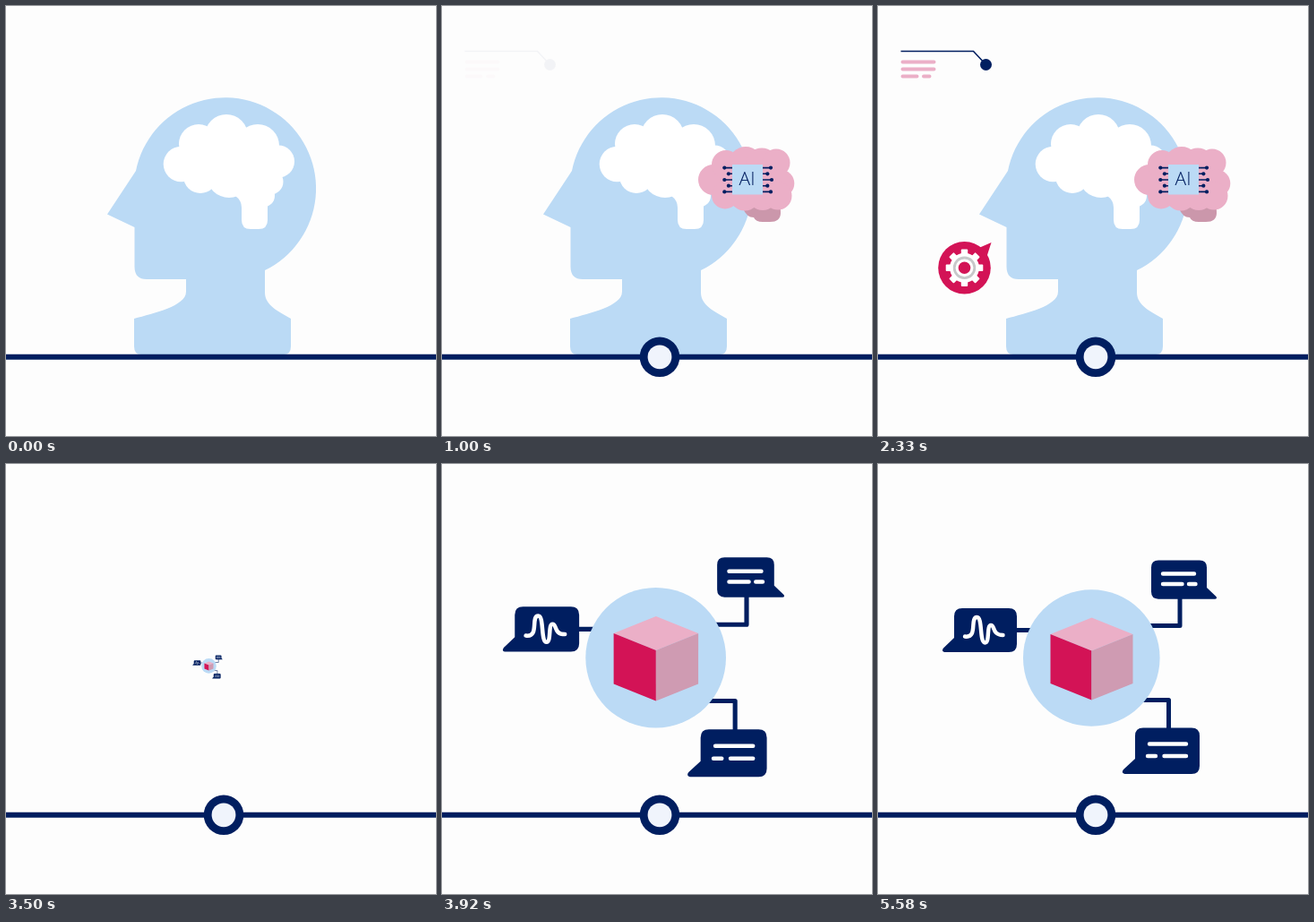
Recreate the animation shown at these times as an HTML page. Size 480 by 480 pixels, loop 5.66 s.

```html
<!DOCTYPE html>
<html lang="en">
<head>
<meta charset="utf-8">
<title>AI brain</title>
<style>
  html, body { margin: 0; width: 100%; height: 100%; overflow: hidden; background: #fdfdfd; }
  svg { display: block; width: 100%; height: 100%; }
  .navy { fill: #001e60; }
  .sky { fill: #bbdaf5; }
  .pink { fill: #ebafc7; }
  .red { fill: #d31356; }
  .white { fill: #fff; }
  .line { fill: none; stroke: #001e60; }
  .text { fill: none; stroke: #fff; stroke-width: 4.4; stroke-linecap: round; stroke-linejoin: round; }
  text { font: 300 21px "Open Sans", Lato, sans-serif; text-anchor: middle; }
</style>
</head>
<body>
<svg viewBox="0 0 480 480">
  <g id="headScene">
    <path class="sky" d="M145 184A101.5 101.5 0 1 1 289 295V320C289 334 304 341 318 349V380Q318 389 310 389H151Q143 389 143 380V349C165 343 201 335 201 319V305H157Q143.5 305 143.5 291V247L113 232.5Z"/>
    <g id="cavity" class="white">
      <path d="M195 160L225 140H280L304 170L298 205L292 222V239Q292 249 282 249H273Q263 249 263 239V225Q263 217 256 212L200 195Z"/>
    </g>
    <g id="brain">
      <path d="M336 222H376Q378 224 378 231Q378 241 366 241H358Q350 241 348 236Q340 236 336 226Z" fill="#cb97ab"/>
      <g id="lobes" class="pink"><path d="M303 177H378V214H303Z"/></g>
    </g>
    <g id="chip">
      <g id="pins"></g>
      <path class="sky" d="M324 177H358V210.500H324Z"/>
      <text class="navy" x="340.500" y="200">AI</text>
    </g>
    <g id="callout">
      <path class="line" stroke-width="1.6" d="M25.500 50.500H106.500L120.500 65.500"/>
      <circle class="navy" cx="120.500" cy="65.500" r="6.500"/>
      <path d="M27.500 62.500H62.500M27.500 70.500H62.500M27.500 78.500H43.500M51 78.500H57.500" stroke="#ebafc7" stroke-width="4" stroke-linecap="round"/>
    </g>
    <g id="ball">
      <circle class="red" cx="96.500" cy="292.300" r="29.300"/>
      <path class="red" d="M108 272L126.500 264L121 281Z"/>
      <g id="gear" class="white" transform="translate(96.500 292.300)">
        <circle r="16.500"/>
        <circle r="11.300" fill="none" stroke="#c8c8ca" stroke-width="2.800"/>
        <circle class="red" r="6.800"/>
      </g>
    </g>
  </g>

  <g id="cubeScene">
    <path class="line" stroke-width="5" stroke-linejoin="round" d="M150 185.500H175M337 145V180.500H298M292 263.500H324.500V300"/>
    <circle class="sky" cx="238.300" cy="216.500" r="76.300"/>
    <path class="pink" d="M238.500 171.500L284.500 190L238.500 208.500L192.500 190Z"/>
    <path class="red" d="M192.500 190L238.500 208.500V263.500L192.500 245Z"/>
    <path d="M284.500 190L238.500 208.500V263.500L284.500 245Z" fill="#cf9bb2"/>
    <g class="navy">
      <path d="M94 161H146Q155 161 155 170V201Q155 210 146 210H74Q70.500 209 73 205.500L85 194V170Q85 161 94 161Z"/>
      <path d="M313 107.500H359Q367 107.500 367 115.500V138L377.500 148Q379 150.500 376 150.700H313Q305 150.500 305 142.500V115.500Q305 107.500 313 107.500Z"/>
      <path d="M296 294.500H350Q359 294.500 359 303.500V337Q359 346 350 346H275.500Q271 345 274 341L287 329V303.500Q287 294.500 296 294.500Z"/>
    </g>
    <path class="text" d="M97 192.500C112 195 102 171 110.500 171C117 171 113 199.500 119.500 199.500C125 199.500 121 180 126 180C131 180 127 191 139.500 191"/>
    <path class="text" d="M318 122.500H353M318 134H339.500M347 134H354.500M303 312.500H344M301 326H310M319.500 326H344"/>
  </g>

  <path class="line" stroke-width="6" d="M0 391.800H480"/>
  <g id="knob">
    <circle class="navy" cx="243" cy="391.800" r="22.300"/>
    <circle cx="243" cy="391.800" r="13.400" fill="#f0f4fc"/>
  </g>
</svg>
<script>
const LOOP = 5660, FRAME = 1000 / 12, CUT = 3488;
const $ = id => document.getElementById(id);

function add(parent, tag, attrs) {
  const el = document.createElementNS("http://www.w3.org/2000/svg", tag);
  for (const key in attrs) el.setAttribute(key, attrs[key]);
  $(parent).append(el);
}
const blobs = (parent, list) => list.forEach(([cx, cy, r]) => add(parent, "circle", { cx, cy, r }));

blobs("cavity", [[195.5, 176.5, 19.8], [215, 154, 22], [246, 145, 24], [281, 156, 24],
  [304, 173.5, 18], [217, 190, 19], [249, 189, 25], [295, 196, 14.5], [288, 212, 12]]);
blobs("lobes", [[303, 194, 17], [317, 177, 16], [339, 176, 19], [357, 176, 17.5], [373, 175, 15.5],
  [378, 198, 15.3], [316, 211.5, 15], [338, 211, 17.5], [358, 211, 17], [375, 212, 15.5]]);

for (let i = 0; i < 5; i++) {
  const y = 180.6 + i * 6.7, inset = i % 2 * 4.6;
  const left = 315.3 + inset, right = 367 - inset * 0.8 + (i === 2 ? 1 : 0);
  add("pins", "path", { class: "line", "stroke-width": 1.6, d: `M${left} ${y}H${right}` });
  for (const cx of [left, right]) add("pins", "circle", { class: "navy", cx, cy: y, r: 2.1 });
}
for (let a = 0; a < 360; a += 45)
  add("gear", "rect", { x: -3.7, y: -20.8, width: 7.4, height: 8, rx: 1, transform: `rotate(${a})` });
// Teeth belong below the ring and hub
$("gear").append(...$("gear").querySelectorAll("circle"));

const progress = (t, start) => Math.min(1, Math.max(0, (t - start) / 500));

function backOut(p) {
  const u = p - 1;
  return p <= 0 ? 0 : 1 + 2.70158 * u ** 3 + 1.70158 * u ** 2;
}

function pop(id, t, start, x, y) {
  const s = backOut(progress(t, start));
  $(id).setAttribute("transform", `translate(${x} ${y}) scale(${s}) translate(${-x} ${-y})`);
  $(id).style.visibility = s > 0 ? "inherit" : "hidden";
}

function draw(now) {
  const t = Math.floor((now % LOOP + 4) / FRAME) * FRAME;
  $("headScene").style.visibility = t < CUT ? "visible" : "hidden";
  pop("knob", t, 0, 243, 391.8);
  pop("brain", t, 0, 339.5, 199.5);
  pop("chip", t, 486, 341, 193.8);
  pop("ball", t, 1500, 97, 292);
  pop("cubeScene", t, CUT, 225, 226.5);
  $("callout").style.opacity = 1 - (1 - progress(t, 990)) ** 2;
}

const origin = performance.now();
function tick() {
  draw(performance.now() - origin);
  requestAnimationFrame(tick);
}
tick();
</script>
</body>
</html>
```
